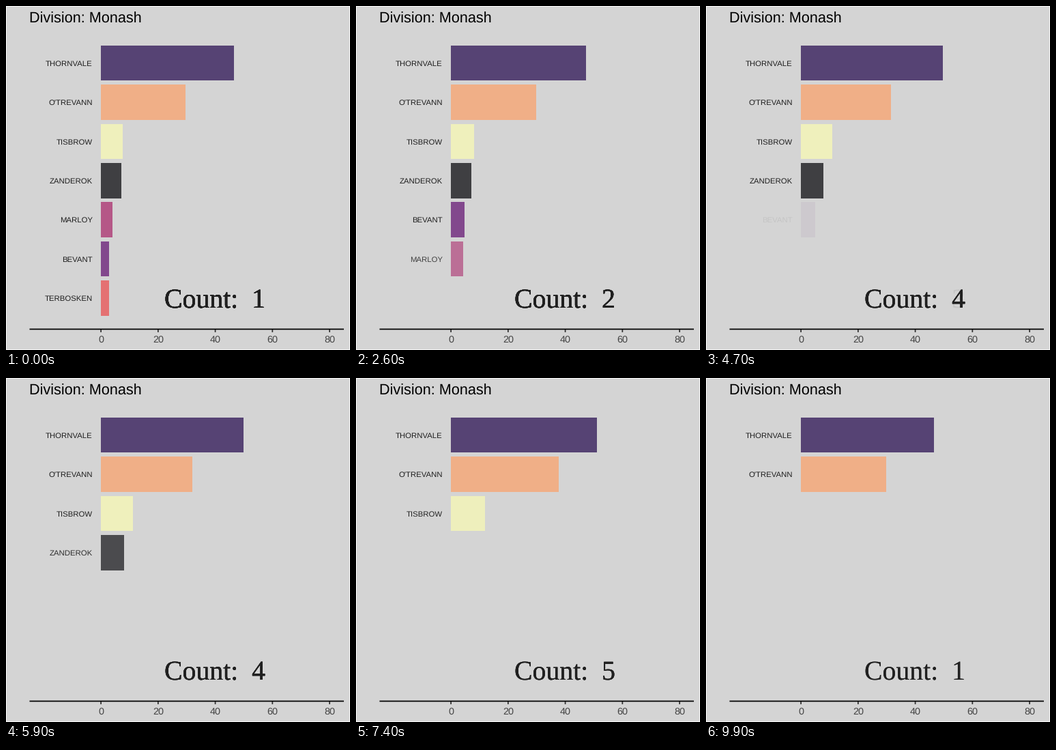
These frames come from a looping animation (504x504 px, 10 s). A matplotlib script:

```python
import matplotlib.pyplot as plt
from matplotlib.animation import FuncAnimation
from matplotlib.patches import Rectangle

plt.rcParams["font.family"] = "Liberation Sans"
plt.rcParams["text.hinting"] = "none"

SIZE, DPI = 504, 72
FRAMES, INTERVAL = 100, 100
X0, SCALE = 139.1, 4.1875            # pixel of zero, pixels per percent
ROW0, PITCH = 83.6, 57.4             # centre of the top row, row spacing
BAR_H = 0.9 * PITCH
BAR_ALPHA = 0.7
AXIS_Y = 473.5
INK = "#202020"
STARTS = (5, 22, 39, 56, 72, 89)     # frame at which each count begins to change
MOVE = 11                            # frames per change

# name: (colour, share of the vote at each count until excluded)
CANDIDATES = {
    "THORNVALE": ("#21064c", (46.5, 46.8, 48.6, 49.8, 51.0, 57.6)),
    "O'TREVANN": ("#fca067", (29.7, 29.8, 30.2, 31.6, 37.6, 42.8)),
    "TISBROW": ("#fbfdb2", (7.6, 7.9, 9.4, 11.1, 11.8)),
    "ZANDEROK": ("#000004", (7.1, 7.1, 7.3, 8.0)),
    "BEVANT": ("#5f0d70", (2.8, 4.6, 4.9)),
    "MARLOY": ("#a82267", (4.0, 4.2)),
    "TERBOSKEN": ("#ec4749", (2.75,)),
}
COUNTS = len(STARTS)


def ease(p):
    return 4 * p**3 if p < 0.5 else 1 - 4 * (1 - p) ** 3


def standings(count):
    """Map each remaining name to (share, row centre)."""
    shares = {n: s[count] for n, (_, s) in CANDIDATES.items() if count < len(s)}
    order = sorted(shares, key=shares.get, reverse=True)
    return {n: (shares[n], ROW0 + PITCH * i) for i, n in enumerate(order)}


TABLE = [standings(c) for c in range(COUNTS)]


def phase(frame):
    """Current count, next count and progress between them."""
    for c, start in enumerate(STARTS):
        if frame < start + MOVE:
            return c, (c + 1) % COUNTS, max(0, frame - start) / MOVE


fig = plt.figure(figsize=(SIZE / DPI, SIZE / DPI), dpi=DPI, facecolor="#d4d4d4")
ax = fig.add_axes([0, 0, 1, 1])
ax.set_xlim(0, SIZE)
ax.set_ylim(SIZE, 0)
ax.axis("off")


def rule(xs, ys, color):
    ax.plot(xs, ys, color=color, lw=1.75, solid_capstyle="butt", snap=False)


ax.add_patch(Rectangle((0, 0), SIZE, SIZE, fill=False, ec="white", lw=1.75))
ax.text(34.5, 25, "Division: Monash", size=21.6, color="black")

for value in range(0, 81, 20):
    x = X0 + SCALE * value
    rule([x, x], [AXIS_Y, AXIS_Y + 4.5], "#333333")
    ax.text(x, 493, str(value), size=14.4, color="#444444", ha="center")
rule([34.5, 495], [AXIS_Y, AXIS_Y], "black")

rows = {}
for name, (color, _) in CANDIDATES.items():
    bar = ax.add_patch(Rectangle((X0, 0), 0, BAR_H, fc=color, lw=0))
    label = ax.text(126.8, 0, name, size=11.38, color=INK, ha="right")
    # every row carries its own copy of the counter
    counter = ax.text(231.7, 442.4, "", size=39.8, color=INK, family="Liberation Serif")
    rows[name] = bar, label, counter


def update(frame):
    now, nxt, p = phase(frame)
    t = ease(p)
    for name, (bar, label, counter) in rows.items():
        shown = name in TABLE[now]
        for artist in (bar, label, counter):
            artist.set_visible(shown)
        if not shown:
            continue
        share, y = TABLE[now][name]
        alpha, number = 1, now
        if name in TABLE[nxt]:
            share2, y2 = TABLE[nxt][name]
            share += (share2 - share) * t
            y += (y2 - y) * t
            number = nxt if p >= 0.5 else now
        else:
            alpha = 1 - t
        bar.set_y(y - BAR_H / 2)
        bar.set_width(SCALE * share)
        bar.set_alpha(BAR_ALPHA * alpha)
        label.set_y(y + 4.1)
        label.set_alpha(alpha)
        counter.set_text(f"Count:  {number + 1}")
        counter.set_alpha(alpha)
    return [artist for row in rows.values() for artist in row]


anim = FuncAnimation(fig, update, frames=FRAMES, interval=INTERVAL,
                     repeat=True, repeat_delay=0)
plt.show()
```
